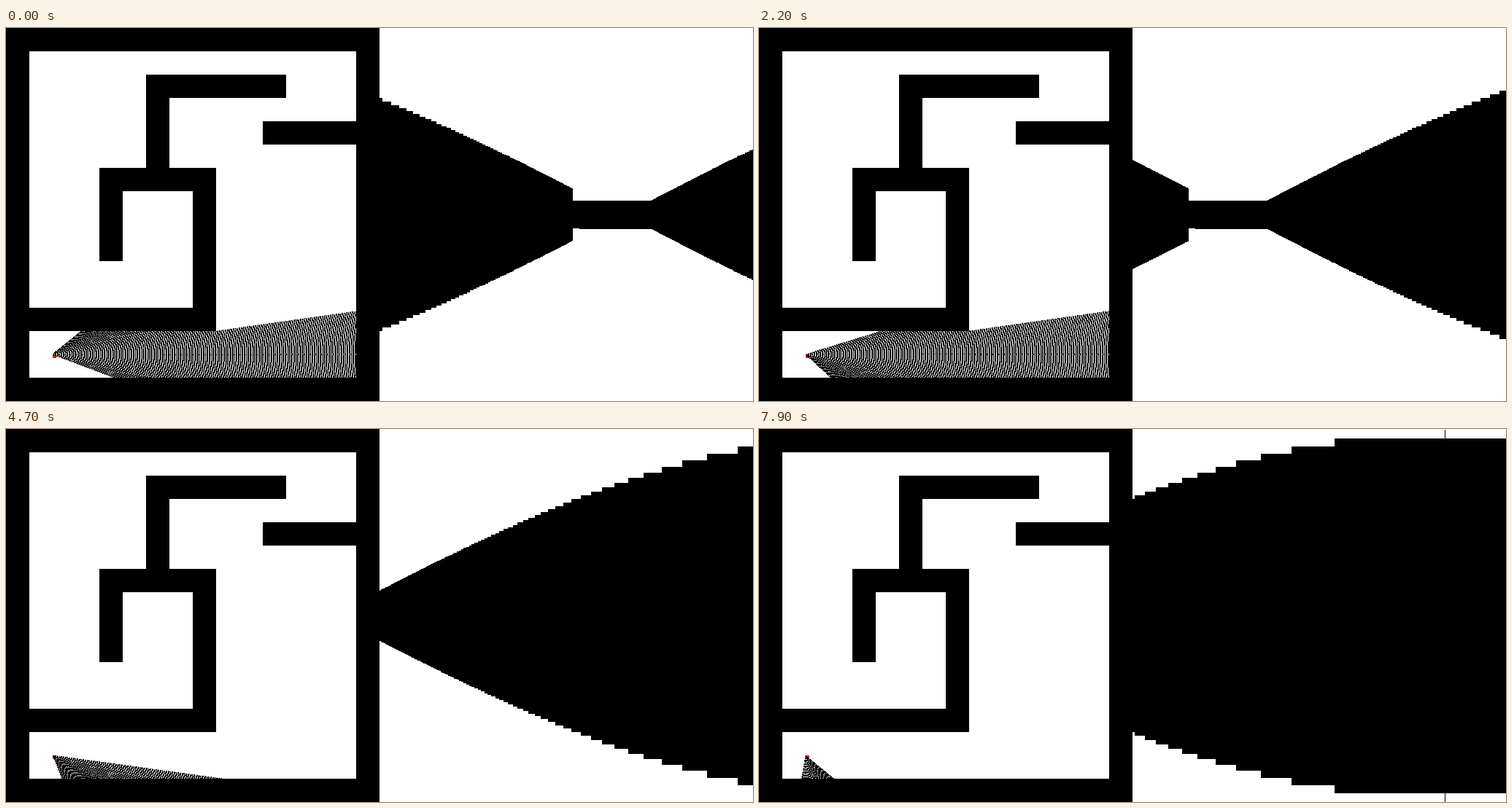
An HTML page with a canvas that plays this animation: 1024x512 px, repeating every 8000 ms.

```html
<!DOCTYPE html>
<html lang="en">
<head>
<meta charset="utf-8">
<title>Ray caster</title>
<style>
  html, body { margin: 0; width: 100%; height: 100%; overflow: hidden; background: #fff; }
  canvas { display: block; width: 1024px; height: 512px; }
</style>
</head>
<body>
<canvas id="stage" width="1024" height="512"></canvas>
<script>
const W = 1024, H = 512, VIEW = 512, TILE = 32, CELLS = 16;
const BLACK = 0xff000000, WHITE = 0xffffffff, RED = 0xff0000ff;
const STEP_MS = 100, STEPS = 80;
const DEG = Math.PI / 180, FOV = Math.PI / 3;
const player = { x: 2, y: 14, heading: -9.1346 * DEG };

// Walls in tiles: x, y, width, height
const walls = [
  [0, 0, 16, 1], [0, 15, 16, 1], [0, 0, 1, 16], [15, 0, 1, 16],
  [6, 2, 6, 1], [6, 2, 1, 4], [11, 4, 4, 1],
  [4, 6, 5, 1], [4, 6, 1, 4], [8, 6, 1, 7], [1, 12, 8, 1]
];

const ctx = document.getElementById('stage').getContext('2d');
const image = ctx.createImageData(W, H);
const pixels = new Uint32Array(image.data.buffer);
const solid = new Uint8Array(CELLS * CELLS);
const f32 = Math.fround;

for (const [x, y, w, h] of walls)
  for (let row = y; row < y + h; row++)
    solid.fill(1, row * CELLS + x, row * CELLS + x + w);

function fillRect(x, y, w, h, color) {
  for (let row = y; row < y + h; row++)
    pixels.fill(color, row * W + x, row * W + x + w);
}

// Marches one ray, marking its path on the map; returns the distance to the wall.
function castRay(angle) {
  const dx = f32(Math.cos(angle)), dy = f32(Math.sin(angle));
  // Single precision keeps the distance steps' rounding at wall boundaries.
  for (let t = 0; t < 20; t = f32(t + f32(0.05))) {
    const x = f32(player.x + t * dx), y = f32(player.y + t * dy);
    pixels[Math.floor(y * TILE) * W + Math.floor(x * TILE)] = BLACK;
    if (solid[Math.floor(y) * CELLS + Math.floor(x)]) return t;
  }
  return 20;
}

function render(step) {
  pixels.fill(WHITE);
  for (const [x, y, w, h] of walls)
    fillRect(x * TILE, y * TILE, w * TILE, h * TILE, BLACK);
  fillRect(player.x * TILE, player.y * TILE, 5, 5, RED);

  const first = player.heading + step * DEG - FOV / 2;
  for (let i = 0; i < VIEW; i++) {
    const height = Math.floor(H / castRay(first + FOV * i / VIEW));
    fillRect(VIEW + i, H / 2 - Math.floor(height / 2), 1, height, BLACK);
  }
  ctx.putImageData(image, 0, 0);
}

let shown = -1;
function tick() {
  const step = Math.floor(performance.now() / STEP_MS) % STEPS;
  if (step !== shown) render(shown = step);
  requestAnimationFrame(tick);
}
tick();
</script>
</body>
</html>
```
